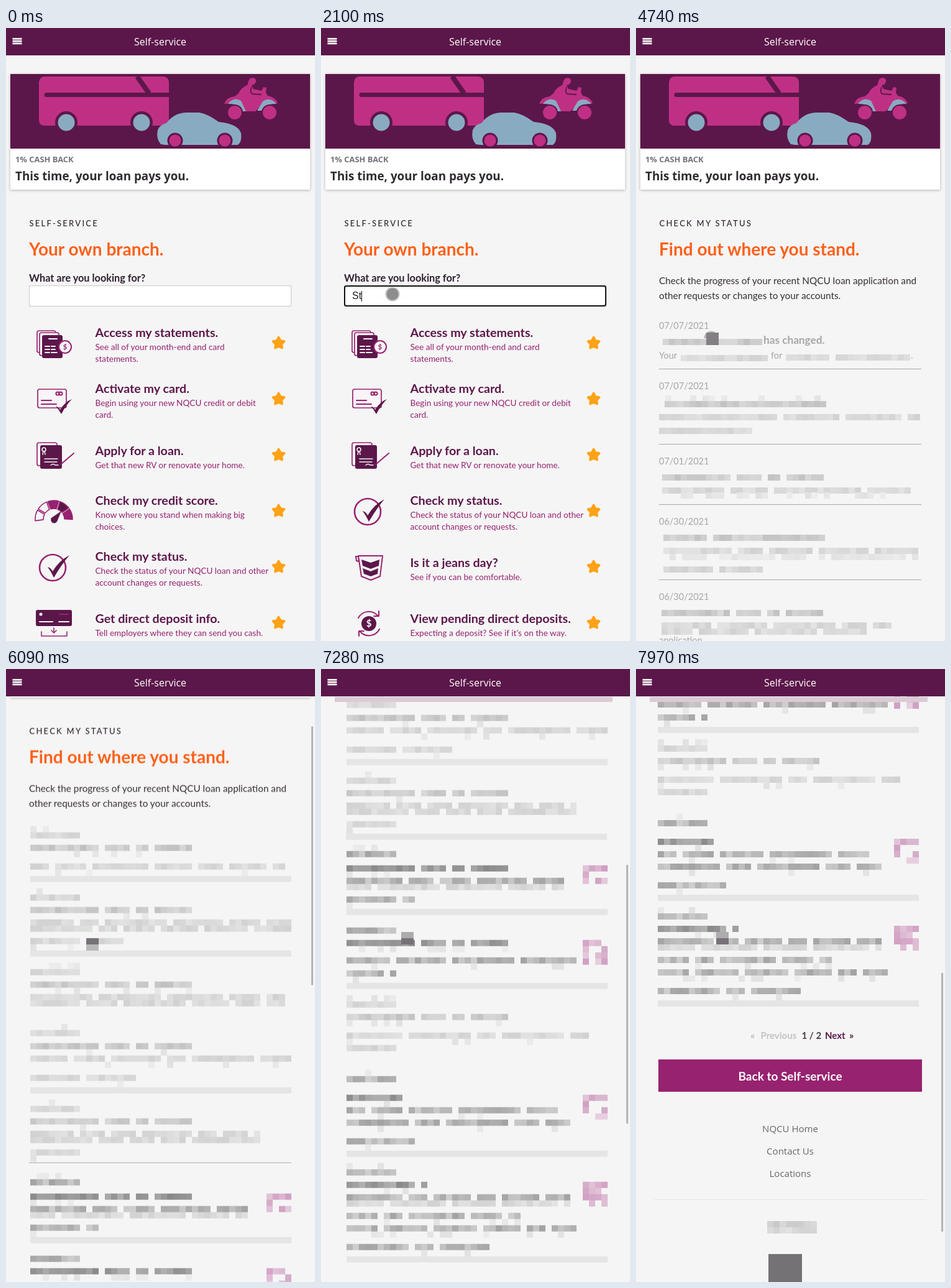
Animation of 497 by 986 pixels, one loop 8 s. Source, as an HTML page:

```html
<!DOCTYPE html>
<html lang="en">
<head>
<meta charset="utf-8">
<title>Self-service</title>
<style>
html, body { margin: 0; width: 100%; height: 100%; overflow: hidden; background: #f5f5f5; }
svg { display: block; width: 497px; height: 986px; }
text { font-family: Lato, "Open Sans", sans-serif; white-space: pre; }
.ui { font-family: "Open Sans", "Noto Sans", sans-serif; }
.mid { text-anchor: middle; }
.bold { font-weight: 700; }
.kicker { font-size: 13px; letter-spacing: 2.25px; font-weight: 500; fill: #2f2630; }
.headline { font-size: 28px; font-weight: 700; fill: #ff6019; }
.title { font-size: 19.7px; font-weight: 700; fill: #5c174a; }
.desc { font-size: 13.6px; fill: #972270; }
.copy { font-size: 15.3px; fill: #372f36; }
.faded { font-size: 14.5px; fill: #a8a6a7; }
.link { font-size: 15px; fill: #69666a; }
.typed { font: 16px "Liberation Sans", Arial, sans-serif; fill: #222; }
.line { fill: none; stroke: #972270; stroke-width: 2; stroke-linecap: round; stroke-linejoin: round; }
.ink { fill: #5c174a; }
.cells { shape-rendering: crispEdges; }
.heart { transform-origin: 248px 590px; }
</style>
</head>
<body>
<svg id="stage" viewBox="0 0 497 986" xmlns="http://www.w3.org/2000/svg"></svg>
<script>
const LOOP = 8000;
const DARK = '#5c174a', PLUM = '#972270', PINK = '#bf3085', BLUE = '#89abc1';

// ---- timeline helpers: times in ms become CSS keyframes ----
let css = '', count = 0;
function track(sel, ease, frames) {
  const name = 'k' + count++;
  const body = frames.map(([t, rule]) => `${t / LOOP * 100}%{${rule}}`).join('');
  css += `@keyframes ${name}{${body}}${sel}{animation:${name} ${LOOP}ms ${ease} infinite}`;
}
function show(sel, ...spans) {
  const frames = spans[0][0] > 0 ? [[0, 'opacity:0']] : [];
  for (const [from, to] of spans) {
    frames.push([from, 'opacity:1']);
    if (to < LOOP) frames.push([to, 'opacity:0']);
  }
  track(sel, 'step-end', frames);
}
const move = (x, y) => `transform:translate(${x}px,${y}px)`;

// ---- drawing helpers ----
const text = (x, y, cls, str, extra = '') => `<text x="${x}" y="${y}" class="${cls}" ${extra}>${str}</text>`;
const rect = (x, y, w, h, fill, extra = '') => `<rect x="${x}" y="${y}" width="${w}" height="${h}" fill="${fill}" ${extra}/>`;
const disc = (x, y, r, fill, extra = '') => `<circle cx="${x}" cy="${y}" r="${r}" fill="${fill}" ${extra}/>`;
const path = (d, extra) => `<path d="${d}" ${extra}/>`;
const line = (d, extra = '') => path(d, `class="line" ${extra}`);
const group = (cls, ...parts) => `<g class="${cls}">${parts.join('')}</g>`;
const polar = (r, deg) => [r * Math.cos(deg * Math.PI / 180), r * Math.sin(deg * Math.PI / 180)];

let seed = 11;
const rand = () => (seed = (seed * 16807) % 2147483647) / 2147483647;

// ---- icons, centred on 0,0 ----
const frame = (x, y, w, h) => rect(x, y, w, h, '#f8f4f7', `rx="3" stroke="${PLUM}" stroke-width="1.7"`);
const tick = path('M-10 0Q-5 1-2 7Q8-10 25-19Q13-5 0 17Q-4 8-10 0Z', 'class="ink"');

function gauge() {
  const fills = ['#f8f4f7', '#f8f4f7', PLUM, DARK, PLUM];
  const wedges = fills.map((fill, i) => {
    const a = 175 + i * 38, b = a + 34;
    const [p, q, r, s] = [polar(30, a), polar(30, b), polar(17, b - 2), polar(17, a + 2)];
    return path(`M${p}A30 30 0 0 1 ${q}L${r}A17 17 0 0 0 ${s}Z`,
      `fill="${fill}" stroke="${PLUM}" stroke-width="1.6" stroke-linejoin="round"`);
  });
  return `<g transform="translate(0 13)">${wedges.join('')}${path('M-4-2L12-13L5 4A5 5 0 1 1-4-2Z', 'class="ink"')}</g>`;
}

const icons = {
  statements: frame(-27, -20, 30, 35) + frame(-23, -17, 31, 37) + rect(-19, -13, 33, 37, DARK, 'rx="3"') +
    line('M-8-7h13M-14 5h7M-14 10h7M-14 15h7M-4 5h6M-4 10h6M-4 15h9', 'style="stroke:#f5f5f5"') +
    disc(18, 6, 10, '#f8f4f7', `stroke="${PLUM}" stroke-width="2"`) +
    text(18, 10, 'mid bold', '$', `font-size="11" fill="${PLUM}"`),
  card: frame(-26, -16, 46, 30) + line('M-20 2h16M-20 8h24') +
    disc(6, -9, 2.6, 'none', `stroke="${PLUM}" stroke-width="2"`) +
    disc(11, -9, 2.6, 'none', `stroke="${PLUM}" stroke-width="2"`) +
    path('M3 11Q8 13 10 17Q18 4 29 0Q19 10 12 24Q8 17 3 11Z', 'class="ink"'),
  loan: frame(-27, -20, 32, 37) + rect(-22, -16, 35, 38, DARK, 'rx="3"') +
    disc(-16, -9, 3, 'none', 'stroke="#f5f5f5" stroke-width="1.6"') +
    line('M-17-6l-1 5M-15-6l1 5M-15 6H6M-15 11H5M-5 16q4-3 7 0h5', 'style="stroke:#f5f5f5;stroke-width:1.5"') +
    line('M11 15L32-3'),
  score: gauge(),
  status: disc(-2, 1, 21, 'none', `stroke="${PLUM}" stroke-width="2.6"`) + tick,
  info: rect(-29, -21, 58, 26, DARK, 'rx="3"') + disc(-21, -14, 2.5, '#f5f5f5') +
    line('M-23-2h21M8-2h16', 'style="stroke:#f5f5f5"') + line('M9-14h14') +
    line('M0 8v7M-4 12l4 4l4-4M-20 14v7h41v-7', 'style="stroke-width:1.6"'),
  jeans: line('M-17-18H22L18 15L3 21L-12 15L-17-18M-21-17h4l1 8l-4-1Z') +
    path('M-12-12L3-7L17-12L16-2L3 3L-10-2ZM-10 2L3 7L15 2L14 11L3 15L-8 11Z', 'class="ink"'),
  pending: disc(0, 1, 12, DARK) + text(0, 6, 'mid bold', '$', 'font-size="15" fill="#fff"') +
    line('M-17-8A19 19 0 0 1 14-12M16-19v8h-8M17 10A19 19 0 0 1-14 14M-16 21v-8h8')
};

// ---- search page ----
const items = {
  statements: ['Access my statements.', 'See all of your month-end and card', 'statements.'],
  card: ['Activate my card.', 'Begin using your new NQCU credit or debit', 'card.'],
  loan: ['Apply for a loan.', 'Get that new RV or renovate your home.'],
  score: ['Check my credit score.', 'Know where you stand when making big', 'choices.'],
  status: ['Check my status.', 'Check the status of your NQCU loan and other', 'account changes or requests.'],
  info: ['Get direct deposit info.', 'Tell employers where they can send you cash.'],
  jeans: ['Is it a jeans day?', 'See if you can be comfortable.'],
  pending: ['View pending direct deposits.', "Expecting a deposit? See if it's on the way."]
};
const starPoints = Array.from({ length: 10 }, (_, i) => polar(i % 2 ? 5.2 : 9.6, i * 36 - 90)).join(' ');

function list(cls, names) {
  return group(cls, ...names.split(' ').map((name, i) => {
    const [title, ...desc] = items[name], y = 507 + 90 * i, base = desc.length > 1 ? y - 10 : y;
    return `<g transform="translate(77 ${y})">${icons[name]}</g>` +
      text(143.5, base, 'title', title) +
      desc.map((d, n) => text(143.5, base + 21 + 19 * n, 'desc', d)).join('') +
      `<polygon points="${starPoints}" transform="translate(438.5 ${y})" fill="#ffa216" stroke="#ffa216" stroke-width="3.4" stroke-linejoin="round"/>`;
  }));
}

const entries = [['S', 1760, 2100, 61], ['St', 2100, 2240, 66], ['Sta', 2240, 2380, 75],
  ['Stat', 2380, 2520, 79], ['Statu', 2520, 2660, 88], ['Status', 2660, 2990, 96]];
const typing = entries.map(([word, from, to, caret], i) => {
  show('.word' + i, [from, to]);
  return group('word' + i, text(50, 436, 'typed', word), rect(caret - 1, 423, 1, 17, '#111'));
});

const search = group('search',
  text(37.5, 319, 'kicker', 'SELF-SERVICE'),
  text(37, 366, 'headline', 'Your own branch.'),
  text(37, 408, 'bold', 'What are you looking for?', 'font-size="16.3" fill="#2f2030"'),
  rect(37.5, 414.5, 421, 33, '#fff', 'stroke="#c9c9c9"'),
  group('focus', rect(38, 415, 420, 32, '#fff', 'rx="3" stroke="#111" stroke-width="2"')),
  group('caret', rect(50, 423, 1, 17, '#111')),
  ...typing,
  list('all', 'statements card loan score status info'),
  list('some', 'statements card loan status jeans pending'),
  list('few', 'statements status'),
  list('one', 'status'));

// ---- loading ----
const loading = group('loading',
  group('heart', path('M243 629C230 616 214 603 205 591C199 583 198 578 198 572C198 556 210 548 222 548C236 548 241 558 248 558C255 558 260 548 274 548C286 548 298 556 298 572C298 578 297 583 291 591C282 603 266 616 253 629Q248 634 243 629Z', `fill="${PLUM}"`)));
const connecting = group('connecting',
  path('M0 966H159Q162 966 162 969V986H0Z', 'fill="#3b3a3b"'),
  text(3, 981, 'ui', 'Connecting...', 'font-size="11.5" fill="#b9adb2"'));

// ---- blurred text built from 10px cells ----
const gray = (lo, hi) => {
  const v = Math.round(lo + (hi - lo) * rand());
  return `rgb(${v},${v - 1},${v})`;
};
const tones = { paleTitle: [194, 218], pale: [210, 228], darkTitle: [138, 178], dark: [164, 208], faint: [226, 238] };
const titleGaps = [11, 16, 19];

function row(x, y, n, tone, gaps) {
  let out = '', left = 3 + rand() * 8 | 0;
  for (let i = 0; i < n; i++) {
    const gap = gaps ? gaps.includes(i) : left-- === 0;
    if (gap) {
      left = 3 + rand() * 8 | 0;
      if (i < n - 1) continue;
    }
    out += rect(x + i * 10, y - 5, 10, 10, gray(...tones[tone]));
  }
  return out;
}
function specks(x, y, n, odds) {
  let out = '';
  for (let i = 0; i < n; i++) if (rand() < odds) out += rect(x + i * 10, y - 5, 10, 10, gray(...tones.faint));
  return out;
}
function badge(y) {
  let out = '';
  for (let i = 0; i < 16; i++) {
    const cx = i % 4, cy = i >> 2, inner = cx % 3 && cy % 3;
    if (rand() < (inner ? .7 : .3)) continue;
    out += rect(420 + cx * 10, y - 20 + cy * 10, 10, 10, `hsl(318,${30 + rand() * 8}%,${72 + rand() * 14}%)`);
  }
  return out;
}

// date y, shade, rule y, title [y, cells], then body rows [y, cells, doubled]
const notices = [
  [482, 'pale', 552, [502, 26], [532, 41]],
  [582, 'pale', 672, [602, 26], [622, 42, 1], [652, 15]],
  [702, 'pale', 0, [722, 26], [742, 41, 1]],
  [800, 'pale', 892, [821, 26], [841, 42], [872, 17]],
  [922, 'pale', 0, [942, 26], [962, 37, 1], [992, 8]],
  [1040, 'dark', 1133, [1063, 26], [1083, 35, 1], [1113, 11]],
  [1163, 'dark', 1252, [1183, 26], [1211, 37], [1232, 8]],
  [1282, 'pale', 0, [1302, 26], [1332, 39], [1352, 8]],
  [1402, 'dark', 1522, [1432, 9], [1452, 34], [1472, 36], [1502, 11]],
  [1552, 'dark', 1692, [1572, 13], [1592, 36, 1], [1622, 28], [1642, 37], [1672, 23]]
];
const moving = notices.map(([y, shade, rule, [ty, tn], ...body]) =>
  specks(40, y - 10, 8, .25) + row(40, y, 8, shade, []) +
  specks(40, ty + 10, tn, .15) + row(40, ty, tn, shade + 'Title', titleGaps) +
  body.map(([by, n, doubled]) => specks(40, by + 10, n, doubled ? 0 : .12) +
    row(40, by, n, shade) + (doubled ? row(40, by + 10, n, 'pale') : '')).join('') +
  (rule ? rect(40, rule - 5, 420, 10, '#e5e5e5') : '') +
  (shade === 'dark' ? badge(ty + 15) : '')).join('');

const dates = [[479, '07/07/2021'], [576, '07/07/2021'], [697, '07/01/2021'], [794, '06/30/2021'], [915, '06/30/2021']];
const still = group('still',
  ...dates.map(([y, d]) => text(37, y + 5, 'faded', d)),
  ...[548, 669, 766, 887].map(y => rect(37, y, 422, 1, '#a9a9a9')),
  text(205, 508, 'faded bold', 'has changed.', 'style="font-size:17.2px"'),
  text(37, 532, 'faded', 'Your'), text(217, 532, 'faded', 'for'), text(442, 532, 'faded', '.'),
  text(37, 990, 'faded', 'application'),
  group('cells',
    row(43, 505, 16, 'paleTitle', []), row(72, 531, 14, 'pale', []), row(241, 530, 20, 'pale', [7]),
    specks(37, 596, 27, .3), row(46, 605, 26, 'paleTitle', []), row(37, 626, 42, 'pale', [19, 29, 39]), row(37, 648, 15, 'pale', []),
    row(42, 723, 26, 'paleTitle', titleGaps), row(42, 744, 40, 'pale', [10, 17, 32]), specks(52, 752, 39, .4),
    row(44, 820, 26, 'paleTitle', [7]), row(44, 841, 41, 'pale', [11, 16, 24, 33]), specks(44, 851, 41, .8), row(44, 871, 16, 'pale', [8]),
    row(41, 941, 26, 'paleTitle', titleGaps), row(41, 961, 37, 'pale'), row(41, 971, 33, 'pale')));

// ---- status page ----
const status = group('status',
  text(37.5, 319, 'kicker', 'CHECK MY STATUS'),
  text(37, 366, 'headline', 'Find out where you stand.'),
  text(37, 412, 'copy', 'Check the progress of your recent NQCU loan application and'),
  text(37, 436, 'copy', 'other requests or changes to your accounts.'),
  still,
  group('moving',
    group('thin', rect(37, 1008, 422, 1, '#a9a9a9')),
    group('cells thick', rect(40, 1007, 420, 10, '#e5e5e5')),
    group('cells blur', moving)),
  text(184, 1749, 'bold', '«', 'font-size="16" fill="#bdbabc"'),
  text(200.5, 1749, 'bold', 'Previous', 'font-size="15" fill="#c4c1c3"'),
  text(266.5, 1749, 'bold', '1 / 2', 'font-size="15" fill="#473a44"'),
  text(304, 1749, 'bold', 'Next', `font-size="15" fill="${DARK}"`),
  text(343, 1749, 'bold', '»', `font-size="16" fill="${DARK}"`),
  rect(36, 1782, 424, 52, PLUM),
  text(248, 1816, 'mid bold', 'Back to Self-service', 'font-size="19" fill="#fff"'),
  ...['NQCU Home', 'Contact Us', 'Locations'].map((s, i) => text(248, 1899 + 36 * i, 'ui link mid', s)),
  rect(29, 2007, 438, 1, '#e3e3e3'),
  group('cells', row(211, 2047, 8, 'paleTitle', []), row(211, 2057, 8, 'pale', [])),
  rect(213, 2095, 54, 54, '#747275'));

// ---- banner card ----
const wheel = (x, y, r, rim, fill) => disc(x, y, rim, DARK) + disc(x, y, r, fill);
const rider = path('M390 86Q391 80 397 80Q403 81 402 87L399 91L395 92L398 98L411 101L414 95L419 96L418 104L421 109Q433 111 437 121L411 124L401 134H386L378 120L351 122Q355 111 368 110L374 105Q378 96 388 92Z', `fill="${PINK}"`);
const card =
  rect(7, 74, 482, 186, '#fff', 'style="filter:drop-shadow(0 1px 2px rgba(0,0,0,.28))"') +
  rect(7, 74, 482, 120, DARK) +
  path('M61 78H253Q262 79 262 88V157H60Q53 156 53 148V87Q54 79 61 78Z', `fill="${PINK}"`) +
  path('M65 107.5H262', `stroke="${DARK}" stroke-width="7" stroke-linecap="round"`) +
  path('M211 78L230 105', `stroke="${DARK}" stroke-width="8"`) +
  wheel(97, 152, 13.5, 18, BLUE) + wheel(218, 152, 13.5, 18, BLUE) +
  path('M249 187Q241 178 244 164Q247 156 258 153Q270 137 289 136H311Q324 138 342 151Q373 154 378 169Q380 183 373 188H256Z', `fill="${BLUE}"`) +
  wheel(272, 181, 9.5, 12.5, PINK) + wheel(352, 181, 9.5, 12.5, PINK) +
  rider +
  path('M357 122Q366 110 378 117L386 134H379Q374 121 357 122ZM435 122Q424 110 413 118L404 133H411Q417 121 435 122Z', `fill="${BLUE}"`) +
  wheel(368, 136, 11, 13, PINK) + wheel(424, 136, 11, 13, PINK) +
  path('M395 95Q392 103 396 106L411 107', `fill="none" stroke="${DARK}" stroke-width="1.8"`) +
  text(15, 216, 'ui bold', '1% CASH BACK', 'font-size="12.9" fill="#77717a"') +
  text(15, 245, 'ui bold', 'This time, your loan pays you.', 'font-size="18.8" fill="#302b31"');

// ---- fixed layers ----
const header = rect(0, 0, 497, 44, DARK) +
  [16, 19.8, 23.6].map(y => rect(10.5, y, 15, 2.7, '#fff')).join('') +
  text(248, 28, 'ui mid', 'Self-service', 'font-size="16" fill="#fff"');

const pointer = group('pointer',
  group('dot', disc(0, 0, 10.5, '#8d8d8d', 'stroke="#c2c2c2" stroke-width="2"')),
  group('press', disc(0, 0, 10.5, '#978a92', 'stroke="#d5aec4" stroke-width="2"')),
  group('half', path('M-11.5 0A11.5 11.5 0 0 1 11.5 0Z', 'fill="#b4b3b4"'), rect(-8, -9, 20, 20, '#828082')),
  group('cells block', rect(-10, 3, 20, 10, '#777277')),
  group('cells under', rect(-10, 13, 20, 10, '#b9b8b9')),
  group('cells over', rect(-10, -7, 20, 10, '#adabad')));

document.getElementById('stage').innerHTML =
  rect(0, 0, 497, 986, '#f5f5f5') +
  group('scroll', card, search, loading, status) +
  group('strip', rect(22, 45, 447, 8, '#dacbd5')) +
  header + connecting +
  group('bar', rect(491, 35, 3, 9, '#49243f'), group('thumb', rect(491, 2, 3, 416, '#b4b2b4'))) +
  pointer;

// ---- timeline ----
show('.search', [0, 2990]);
show('.focus', [800, 2990]);
show('.caret', [830, 1230]);
show('.all', [0, 2100]);
show('.some', [2100, 2240]);
show('.few', [2240, 2520]);
show('.one', [2520, 2990]);
show('.loading', [2990, 3740]);
show('.connecting', [3250, 3810]);
show('.still', [0, 5940]);
show('.moving', [5940, LOOP]);
show('.thin', [5940, 6740]);
show('.thick', [6740, LOOP]);
show('.strip', [6740, LOOP]);
show('.bar', [5940, LOOP]);
show('.dot', [130, 830], [1030, 2920], [5110, 5940]);
show('.press', [830, 1030], [2920, 3740]);
show('.half', [3740, 5110]);
show('.block', [5940, LOOP]);
show('.under', [5940, 6540]);
show('.over', [6540, LOOP]);

track('.status', 'linear', [[0, 'opacity:0'], [3740, 'opacity:0'], [3940, 'opacity:1'], [LOOP, 'opacity:1']]);
track('.heart', 'ease-in-out', [[0, 'transform:scale(.9)'], [2990, 'transform:scale(.9)'],
  [3390, 'transform:scale(1)'], [3740, 'transform:scale(.9)'], [LOOP, 'transform:scale(.9)']]);
track('.blur', 'step-end', [[0, move(-1, 0)], [6740, move(1, 0)], [7540, move(-5, 0)]]);
track('.pointer', 'ease-in-out', [[0, move(160, 881)], [130, move(160, 881)], [700, move(115, 428)],
  [2560, move(115, 428)], [2840, move(115, 499)], [4670, move(115, 499)], [4740, move(121, 499)],
  [4870, move(131, 499)], [5070, move(131, 499)], [5540, move(139, 430)], [LOOP, move(139, 430)]]);

const stops = [[0, 0], [5900, 0], [6090, 214], [6340, 300], [6700, 300], [7280, 742], [7510, 800], [7550, 800], [7970, 1154], [LOOP, 1154]];
track('.scroll', 'linear', stops.map(([t, y]) => [t, move(0, -y)]));
track('.thumb', 'linear', stops.map(([t, y]) => [t, move(0, y / 2.37)]));

document.head.appendChild(document.createElement('style')).textContent = css;
</script>
</body>
</html>
```
